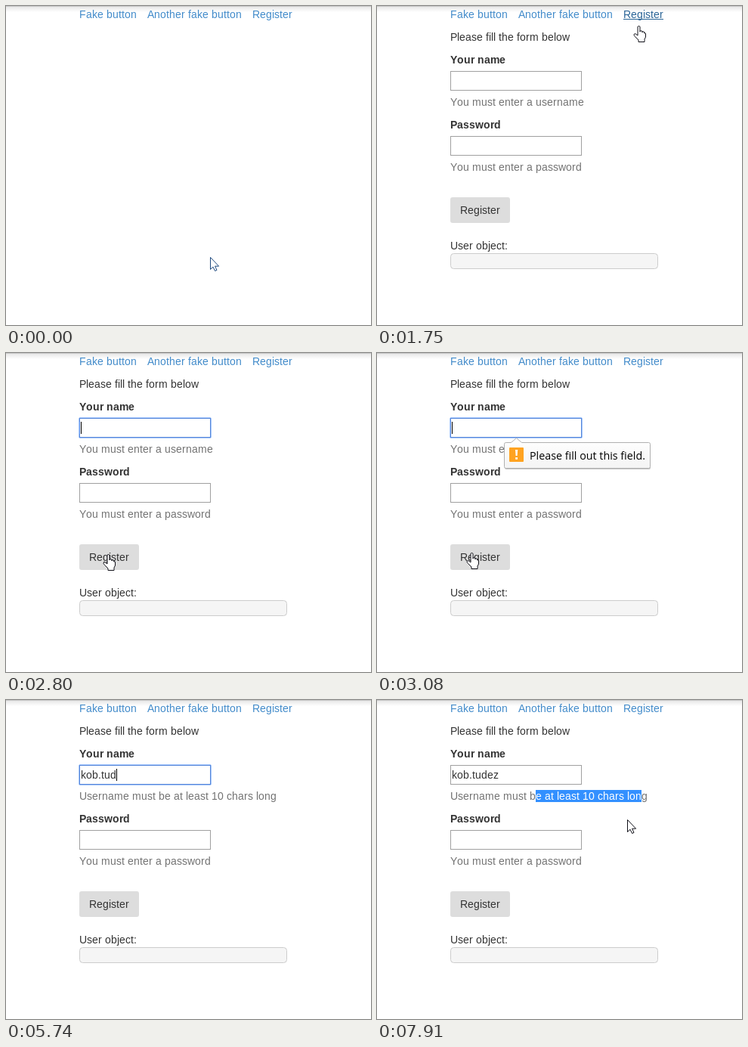
An HTML page for the animation above (8 s loop, 483 by 422 pixels).

```html
<!DOCTYPE html>
<html lang="en">
<head>
<meta charset="utf-8">
<title>Register form</title>
<style>
  html, body { margin: 0; width: 100%; height: 100%; overflow: hidden; background: #fff; }
  svg { display: block; }
  text { font: 14px "Liberation Sans", Arial, sans-serif; fill: #333; }
  .bold { font-weight: bold; }
  .help { fill: #737373; }
  .link { fill: #428bca; }
  .active .link { fill: #2a6496; }
  .selected { fill: #fff; }
  .field { fill: #fff; stroke: #a0a0a0; }
  .tip text { font: 14.3px "Open Sans", sans-serif; fill: #000; }
  .list text { font: 11.35px "Open Sans", sans-serif; fill: #000; }
  .pointer path { fill: #fff; stroke: #101018; stroke-linejoin: round; }
  .pointer #ibeam { fill: none; stroke: #333; }
</style>
</head>
<body>
<svg width="483" height="422" viewBox="0 0 483 422">
  <defs>
    <linearGradient id="edge" x2="0" y2="1">
      <stop stop-color="#e4e4e4"/><stop offset="1" stop-color="#fff"/>
    </linearGradient>
    <linearGradient id="bubble" x2="0" y2="1">
      <stop stop-color="#fff"/><stop offset="1" stop-color="#f4f4f4"/>
    </linearGradient>
    <clipPath id="range"><rect id="rangeBox" x="210" y="119" width="0" height="16"/></clipPath>
  </defs>

  <rect width="483" height="8" fill="url(#edge)"/>
  <rect width="483" height="1" fill="#c6c6c6"/>
  <text class="link" x="97" y="16">Fake button</text>
  <text class="link" x="187" y="16">Another fake button</text>
  <g id="register">
    <text class="link" x="326" y="16">Register</text>
    <rect id="underline" x="326" y="17" width="53" height="1" fill="#2a6496"/>
  </g>

  <g id="form">
    <text x="97" y="46">Please fill the form below</text>
    <text class="bold" x="97" y="76">Your name</text>
    <rect class="field" x="97.5" y="86.5" width="173" height="25"/>
    <g id="focus" fill="none">
      <rect x="96.5" y="85.5" width="175" height="27" rx="1.5" stroke="#4d90fe" stroke-opacity=".5"/>
      <rect x="97.5" y="86.5" width="173" height="25" stroke="#5686d8"/>
    </g>
    <text id="value" x="99" y="104"></text>
    <rect id="caret" y="91" width="1" height="16" fill="#000"/>
    <text class="help" id="needName" x="97" y="132">You must enter a username</text>
    <g id="tooShort">
      <text class="help" x="97" y="132">Username must be at least 10 chars long</text>
      <g clip-path="url(#range)">
        <rect x="210" y="119" width="150" height="16" fill="#3390ff"/>
        <text class="selected" x="97" y="132">Username must be at least 10 chars long</text>
      </g>
    </g>
    <text class="bold" x="97" y="162">Password</text>
    <rect class="field" x="97.5" y="172.5" width="173" height="25"/>
    <text class="help" x="97" y="218">You must enter a password</text>
    <rect x="97" y="253" width="79" height="34" rx="3" fill="#ddd"/>
    <text x="110" y="275">Register</text>
    <text x="97" y="322">User object:</text>
    <rect x="97.5" y="327.5" width="274" height="20" rx="4" fill="#f5f5f5" stroke="#ccc"/>
  </g>

  <g id="tip" class="tip">
    <rect x="169" y="120" width="193" height="34" rx="2" fill="#000" opacity=".22"/>
    <path d="M170.5 118.5H177.5L184.5 112.5 191.5 118.5H359.5Q361.5 118.5 361.5 120.5V150.5Q361.5 152.5 359.5 152.5H170.5Q168.5 152.5 168.5 150.5V120.5Q168.5 118.5 170.5 118.5Z" fill="url(#bubble)" stroke="#b0b0b0"/>
    <rect x="175" y="125" width="19" height="19" rx="1" fill="#ffa321"/>
    <path d="M183 128h3.2l-.6 8h-2zM183.2 138h2.8v2.8h-2.8z" fill="#fff"/>
    <text x="202" y="140.5">Please fill out this field.</text>
  </g>

  <g id="list" class="list">
    <rect id="listBox" x="97.5" y="112.5" width="173" height="145" fill="#fff" stroke="#b4b4b4"/>
  </g>

  <g id="pointer" class="pointer">
    <path id="arrow" d="M.5 .5V16.5L4 13.2 6.6 18.5 9 17.4 6.6 12.2H11.6Z"/>
    <path id="hand" d="M6 13V2Q6 .5 7.5 .5T9 2V8Q9 6.7 10.5 6.7T12 8V9Q12 7.7 13.3 7.7T14.7 9V10Q16.5 9 16.5 11V15L15 18V21.5H7V19L2.5 14.5Q0 12 1.5 11T4 11.5Z"/>
    <path id="ibeam" d="M-3 -7.5H-1L.5 -6.5 2 -7.5H4M.5 -6.5V6.5M-3 7.5H-1L.5 6.5 2 7.5H4"/>
  </g>
</svg>

<script>
const LOOP = 8000, TICK = 70;
const $ = id => document.getElementById(id);
const show = (id, level) => $(id).setAttribute('opacity', Number(level));
const clamp = v => Math.max(0, Math.min(1, v));
const ctx = document.createElement('canvas').getContext('2d');

// Glyph positions on whole pixels, as in classic screen text.
function positions(text, x, bold) {
  ctx.font = (bold ? 'bold ' : '') + '14px "Liberation Sans", Arial, sans-serif';
  const xs = [x];
  for (const c of text) xs.push(x += Math.round(ctx.measureText(c).width));
  return xs;
}
function snap(el, x) {
  const xs = positions(el.textContent, x, el.classList.contains('bold'));
  el.setAttribute('x', xs.join(' '));
}
for (const el of document.querySelectorAll('text:not(.tip text)')) snap(el, +el.getAttribute('x'));

const names = ['misty_pebbles', 'tomo67890', 'tomo6789', 'kobluda.z', 'redfoxxq', 'RedFoxxq'];
const match = 3;
const items = names.map(name => {
  const el = document.createElementNS('http://www.w3.org/2000/svg', 'text');
  el.textContent = name;
  el.setAttribute('x', 100);
  $('list').append(el);
  return el;
});

const entry = 'kob.tudez';
const strokes = [4550, 4620, 5040, 5390, 5460, 5600, 5740, 5810, 5950];
const caretXs = positions(entry, 99);
const helpXs = positions('Username must be at least 10 chars long', 97);

// time, x, y, shape
const path = [
  [0, 270, 332, 'arrow'], [490, 270, 332, 'arrow'], [630, 290, 285, 'arrow'],
  [770, 336, 165, 'arrow'], [910, 354, 92, 'arrow'], [980, 365, 56, 'arrow'],
  [1120, 400, 32, 'arrow'], [1260, 382, 22, 'arrow'], [1330, 351, 14, 'hand'],
  [1470, 347, 12, 'hand'], [1680, 347, 12, 'hand'], [1820, 330, 40, 'arrow'],
  [2170, 215, 205, 'arrow'], [2380, 147, 262, 'hand'], [2450, 143, 264, 'hand'],
  [2590, 142, 264, 'hand'], [2800, 128, 266, 'hand'], [2940, 121, 265, 'hand'],
  [3080, 118, 264, 'hand'], [3290, 118, 264, 'hand'], [3360, 92, 242, 'arrow'],
  [3430, 71, 203, 'arrow'], [3500, 94, 140, 'arrow'], [3570, 124, 101, 'ibeam'],
  [4130, 124, 101, 'ibeam'], [4270, 130, 101, 'ibeam'], [6650, 130, 101, 'ibeam'],
  [6790, 150, 118, 'arrow'], [6930, 186, 150, 'arrow'], [7140, 210, 128, 'ibeam'],
  [7210, 210, 127, 'ibeam'], [7420, 232, 126, 'ibeam'], [7770, 348, 127, 'ibeam'],
  [7840, 342, 140, 'arrow'], [7910, 331, 158, 'arrow']
];

function pointerAt(t) {
  let i = path.length - 1;
  while (path[i][0] > t) i--;
  const [t0, x0, y0, shape] = path[i];
  const [t1, x1, y1] = path[i + 1] || [LOOP, x0, y0];
  const k = (t - t0) / (t1 - t0);
  return { x: Math.round(x0 + (x1 - x0) * k), y: Math.round(y0 + (y1 - y0) * k), shape };
}

function drawPointer(t, { x, y, shape }) {
  show('pointer', t < 4340 || t >= 6650);
  $('pointer').setAttribute('transform', `translate(${x} ${y})`);
  for (const id of ['arrow', 'hand', 'ibeam']) show(id, id === shape);
  $('arrow').style.stroke = t < 560 ? '#1f4a7f' : '';
}

function drawList(t) {
  const single = t >= 4550;
  show('list', t < 5390 ? clamp((t - 3710) / 280) : 0);
  $('listBox').setAttribute('height', single ? 25 : 145);
  items.forEach((el, i) => {
    el.setAttribute('y', 129 + 24 * (single ? 0 : i));
    el.setAttribute('opacity', Number(!single || i === match));
  });
}

function drawEntry(t) {
  const count = strokes.filter(s => s <= t).length;
  const value = $('value');
  value.textContent = entry.slice(0, count);
  snap(value, 99);
  $('caret').setAttribute('x', caretXs[count]);
  show('caret', (t >= 2660 && t < 3360) || (t >= 3780 && t < 4270) || (t >= 4550 && t < 6370));
}

function drawSelection(t, x) {
  let end = 210;
  if (t >= 7770) end = 350;
  else if (t >= 7210) end = helpXs.reduce((a, b) => Math.abs(b - x) < Math.abs(a - x) ? b : a);
  $('rangeBox').setAttribute('width', Math.max(0, end - 210));
}

function draw(now) {
  const t = Math.floor(now % LOOP / TICK) * TICK;
  const pointer = pointerAt(t);
  const active = t >= 1330 && t < 2660;
  $('register').setAttribute('class', active ? 'active' : '');
  show('underline', active);
  show('form', t >= 1750);
  show('focus', t >= 2660 && t < 7210);
  show('needName', t < 4550);
  show('tooShort', t >= 4550);
  show('tip', t < 4550 ? clamp((t - 2870) / 210) : t < 4620 ? 0.5 : 0);
  drawEntry(t);
  drawList(t);
  drawSelection(t, pointer.x);
  drawPointer(t, pointer);
}

const start = performance.now();
function frame() {
  draw(performance.now() - start);
  requestAnimationFrame(frame);
}
frame();
</script>
</body>
</html>
```
